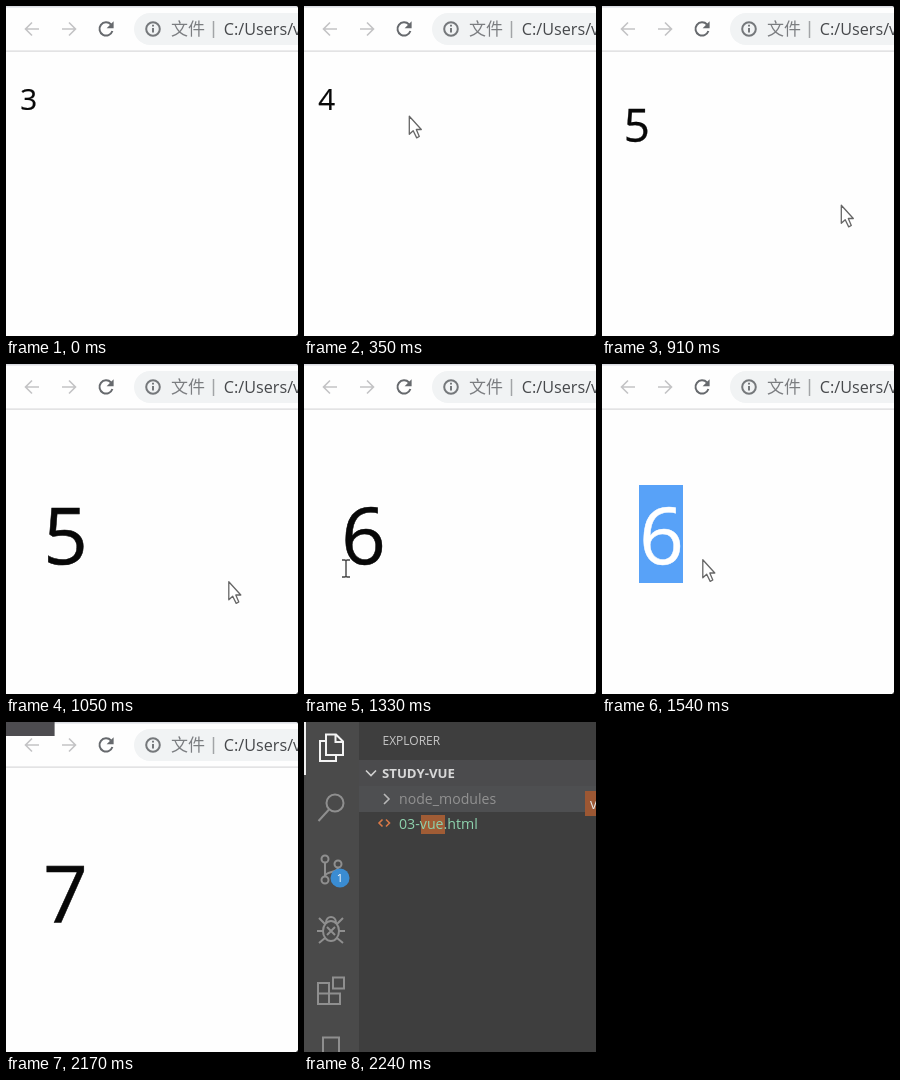
Write an HTML page that moves like this. It is 292 px wide and 330 px high and loops after 2.38 s.

```html
<!DOCTYPE html>
<html lang="en">
<head>
<meta charset="utf-8">
<title>Counter in a browser</title>
<style>
html, body { margin: 0; width: 100%; height: 100%; overflow: hidden; background: #fff; }
svg { display: block; width: 292px; height: 330px; }
text { font-family: "Open Sans", "Noto Sans", sans-serif; white-space: pre; }
.cjk { font-family: "Noto Sans CJK SC", "Noto Sans CJK", sans-serif; }
.line { fill: none; stroke-width: 1.6; }
.bold { stroke-width: 2; }
.icon { fill: none; stroke: #8f8f8f; stroke-width: 2; }
</style>
</head>
<body>
<svg viewBox="0 0 292 330">
  <g id="browser">
    <rect width="292" height="330" fill="#fefefe"/>
    <rect width="292" height="1.5" fill="#dadce2"/>
    <rect y="44.5" width="292" height="1.2" fill="#d9d9db"/>
    <path class="line" stroke="#c3c3c5" d="M33 23H20M26 16.5 19.5 23 26 29.5"/>
    <path class="line" stroke="#c3c3c5" d="M56 23H69M63 16.5 69.5 23 63 29.5"/>
    <path class="line bold" stroke="#66696d" d="M105 18.5A6.6 6.6 0 1 0 106.4 25"/>
    <path fill="#66696d" d="M107.6 15.2v7h-7z"/>
    <rect x="128" y="7" width="190" height="32" rx="16" fill="#f1f3f4"/>
    <circle class="line bold" cx="147" cy="23" r="6.8" stroke="#75787b"/>
    <path class="line bold" stroke="#75787b" d="M147 22v4.6M147 18.8v1.8"/>
    <text class="cjk" x="165" y="29" font-size="17" fill="#7b7d80">文件</text>
    <path d="M207.5 15v17" stroke="#a2a4a7" stroke-width="1.5"/>
    <text x="217.8" y="29" font-size="16.2" fill="#46484b">C:/Users/v</text>
    <path fill="#444" d="M290.5 0h1.5v1.5zM292 328v2h-2z"/>
    <rect id="mark" x="37" y="121" width="44" height="98" fill="#58a2f8"/>
    <g id="page">
      <text id="count" x="22.6" y="103.8" font-size="29.6" stroke-width=".2" text-anchor="middle"></text>
    </g>
    <path id="arrow" fill="#fff" stroke="#666" stroke-width="1.3" stroke-linejoin="round"
      d="M.8.8V18.8L4.7 15.2 8.2 22.4 10.8 21 7.8 14H12.8Z"/>
    <path id="beam" fill="none" stroke="#444" stroke-width="1.4"
      d="M-4-8.5h3L0-7.5 1-8.5h3M0-7.5v15M-4 8.5h3L0 7.5 1 8.5h3"/>
    <rect id="corner" width="48.6" height="14" fill="#4d4c50"/>
  </g>

  <g id="editor">
    <rect width="292" height="330" fill="#3e3e3e"/>
    <rect width="55" height="330" fill="#4a4a4a"/>
    <rect width="2" height="53" fill="#f0f0f0"/>
    <rect x="55" y="38" width="237" height="26" fill="#4b4b4d"/>
    <rect x="55" y="64" width="237" height="26" fill="#4e4f51"/>
    <g class="icon" style="stroke:#f4f4f4">
      <path d="M22 12.5h10l7 7V33H22zM31.5 13v7H39"/>
      <path d="M22 19h-6v20h16v-6"/>
    </g>
    <g class="icon">
      <circle cx="31" cy="81" r="8.5"/>
      <path d="M25 87.5 14.5 99"/>
      <circle cx="21" cy="137" r="3.5"/>
      <circle cx="21" cy="158" r="3.5"/>
      <circle cx="34" cy="142" r="3.5"/>
      <path d="M21 140.5v14M34 145.5c0 6-13 3-13 9"/>
      <ellipse cx="27" cy="209" rx="8" ry="10"/>
      <path d="M22 201c0-8 10-8 10 0M13 209h6M35 209h6M15 196l6 6M39 196l-6 6M15 221l6-5M39 221l-6-5M23 205l8 8M31 205l-8 8"/>
      <path d="M14 261h11v21H14zM14 271.5h22V282H25M29 255.5h11v11H29z"/>
      <path d="M19 331V315.5h16V331"/>
    </g>
    <circle cx="36" cy="156" r="9.5" fill="#3a8cd2"/>
    <text x="36" y="160" font-size="11" text-anchor="middle" fill="#fff">1</text>
    <text x="78.5" y="23" font-size="12" fill="#c6c6c6">EXPLORER</text>
    <path class="line" stroke="#d0d0d0" d="M62 48.5l5 5 5-5"/>
    <text x="78" y="56" font-size="13.2" font-weight="700" fill="#d8d8d8">STUDY-VUE</text>
    <path class="line" stroke="#b8b8b8" d="M80 72l5 5-5 5"/>
    <text x="95" y="82" font-size="14.1" fill="#929292">node_modules</text>
    <path class="line" stroke="#d97846" d="M78.5 97.5 75 101l3.5 3.5M82 97.5l3.5 3.5-3.5 3.5"/>
    <rect x="117" y="93" width="24" height="19" fill="#a05c35"/>
    <text x="95" y="107" font-size="14.2" fill="#8ed3ae">03-vue.html</text>
    <rect x="281" y="69" width="11" height="25" fill="#9c5733"/>
    <text x="286" y="87" font-size="14" fill="#e4e4e4">v</text>
  </g>
</svg>
<script>
const LOOP = 2380, STEP = 70;
const $ = id => document.getElementById(id);
const [browser, editor, page, count, mark, arrow, beam, corner] =
  ["browser", "editor", "page", "count", "mark", "arrow", "beam", "corner"].map($);

// Pointer stops: time, x, y
const path = [
  [280, 42, 99], [420, 167, 120], [490, 167, 120], [560, 215, 155],
  [630, 250, 180], [700, 251, 188], [770, 243, 192], [840, 243, 192],
  [980, 234, 205], [1050, 222, 217], [1120, 188, 247], [1190, 138, 259],
  [1260, 82, 236], [1330, 42, 204.5], [1400, 24, 198], [1470, 72, 200],
  [1540, 100, 195], [1820, 94, 196]
];

const show = (el, on) => el.setAttribute("visibility", on ? "visible" : "hidden");
const place = (el, x, y) => el.setAttribute("transform", `translate(${x} ${y})`);

function pointer(t) {
  const i = path.findIndex(p => p[0] >= t);
  if (i < 0 || t < path[0][0]) return null;
  const b = path[i], a = path[Math.max(0, i - 1)];
  const k = b === a ? 0 : (t - a[0]) / (b[0] - a[0]);
  return [a[1] + (b[1] - a[1]) * k, a[2] + (b[2] - a[2]) * k];
}

function draw(now) {
  const t = Math.floor((now % LOOP) / STEP) * STEP;
  const inEditor = t >= 2240;
  browser.style.display = inEditor ? "none" : "";
  editor.style.display = inEditor ? "" : "none";

  const zoom = 1 + 1.63 * Math.min(1, Math.max(0, (t - 840) / 210));
  const selected = t >= 1470 && t < 1820;
  const ink = selected ? "#fff" : "#080808";
  count.textContent = 3 + Math.floor((t + 420) / 560);
  count.setAttribute("fill", ink);
  count.setAttribute("stroke", ink);
  page.setAttribute("transform", `translate(0 45) scale(${zoom}) translate(0 -45)`);
  show(mark, selected);

  const p = pointer(t), overText = t === 1330 || t === 1470;
  show(arrow, p && !overText);
  show(beam, p && overText);
  if (p) place(overText ? beam : arrow, ...p);

  show(corner, t >= 2100);
  corner.setAttribute("opacity", t < 2170 ? 0.5 : 1);
}

const start = performance.now();
function tick() {
  draw(performance.now() - start);
  requestAnimationFrame(tick);
}
tick();
</script>
</body>
</html>
```
